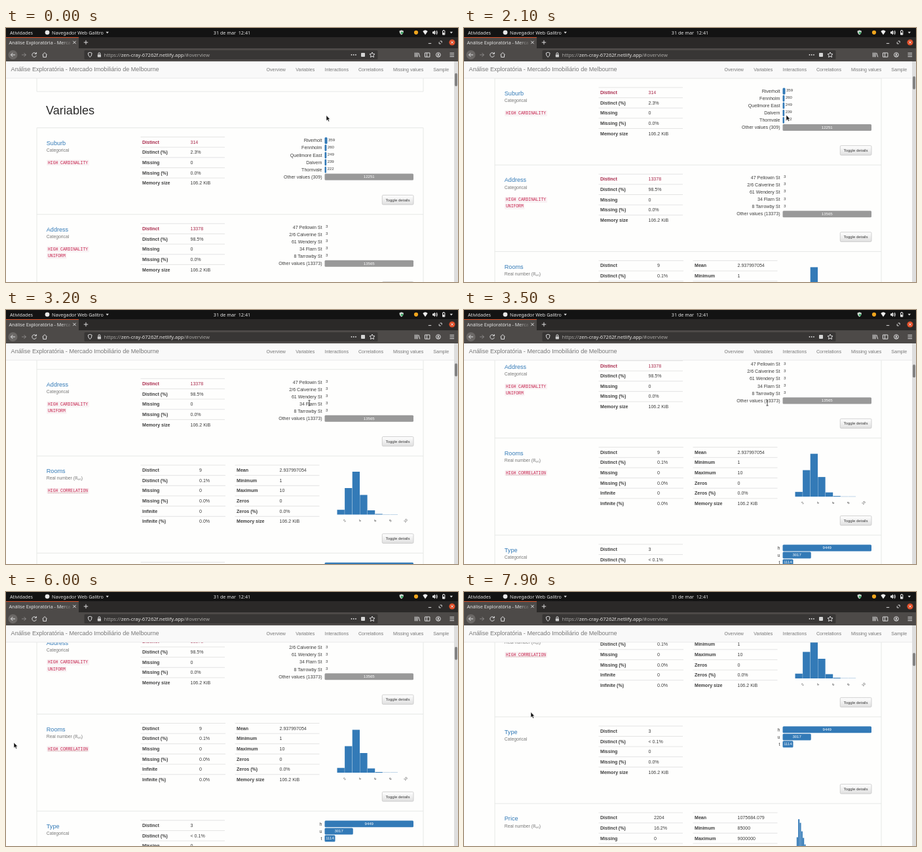
Recreate the animation shown at these times as an HTML page. Size 690 by 388 pixels, loop 8 s.

```html
<!DOCTYPE html>
<html lang="pt">
<head>
<meta charset="utf-8">
<style>
html, body { margin: 0; width: 100%; height: 100%; overflow: hidden; background: #fefefd; }
svg { display: block; width: 690px; height: 388px; font: 7.07px "Liberation Sans", Arial, sans-serif; fill: #3d3d3d; }
text { white-space: pre; }
.ui { font: 7.2px "Noto Sans", sans-serif; fill: #e6e6e6; }
.url { font-size: 7.6px; fill: #a9a7a5; }
.brand { font-size: 9.09px; fill: #777; }
.nav { fill: #777; }
.h1 { font-size: 18.1px; fill: #2a2a2a; }
.name { font-size: 9.09px; fill: #337ab7; }
.cap { font-size: 6.82px; fill: #777; }
.code { font: 6.36px "Liberation Mono", monospace; fill: #c7254e; }
.b { font-weight: bold; }
.hot { fill: #a8284a; }
.small { font-size: 6.06px; }
.in { font-size: 6.06px; fill: #fff; }
.tick { font-size: 5px; }
.end { text-anchor: end; }
.mid { text-anchor: middle; }
.ico { fill: none; stroke: #dededf; stroke-width: 1; }
.rule { stroke: #ddd; stroke-width: .8; }
.box { fill: none; stroke: #e6e8e6; }
</style>
</head>
<body>
<svg id="stage" viewBox="0 0 690 388"></svg>
<script>
const BLUE = '#337ab7', GRAY = '#999', CHROME = '#4d4a48', FIELD = '#383635';
const text = (x, y, s, cls = '') => `<text x="${x}" y="${y}" class="${cls}">${s}</text>`;
const rect = (x, y, w, h, fill, more = '') =>
  `<rect x="${x}" y="${y}" width="${w}" height="${h}" fill="${fill}" ${more}/>`;
const dot = (x, y, r, fill) => `<circle cx="${x}" cy="${y}" r="${r}" fill="${fill}"/>`;
const icon = (d, more = '') => `<path class="ico" d="${d}" ${more}/>`;
const rule = (x1, x2, y) => `<path class="rule" d="M${x1} ${y}H${x2}"/>`;

// rows: [label, value, highlighted]
function table(x1, x2, valueX, top, rows) {
  return rows.map(([label, value, hot], i) => {
    const y = top + 14 + i * 15.65, c = hot ? ' hot' : '';
    return rule(x1, x2, y) + text(x1 + 2.5, y + 10.1, label, 'b' + c) + text(valueX, y + 10.1, value, c);
  }).join('');
}

// items: [label, count, colour]
function bars(top, max, items) {
  return items.map(([label, n, fill = BLUE], i) => {
    const y = top + 14.5 + i * 11.1, w = n / max * 135.5, wide = w > 12;
    return text(482.5, y + 7.3, label, 'end') +
      (w > 1 ? rect(486.5, y, w, 10, fill, 'rx="1.5"') : '') +
      text(wide ? 486.5 + w / 2 : 488 + w, y + (wide ? 6.8 : 5.6), n, wide ? 'in mid' : 'small');
  }).join('');
}

function histogram(top, step, heights) {
  return heights.map((h, i) =>
    rect(505.5 + i * step, top + 89.5 - h, step - .3, h, BLUE)).join('');
}

function card(top, bottom, name, caption, codes = [], dotted) {
  const tags = codes.map((s, i) => {
    const y = top + 48.8 + i * 10.1;
    return rect(62, y, s.length * 3.816 + 4, 9, '#f9f2f4', 'rx="1.5"') + text(64, y + 6.3, s, 'code') +
      (dotted ? `<path d="M64 ${y + 7.7}h${s.length * 3.816}" stroke="#b77" stroke-width=".6" stroke-dasharray="1 .6"/>` : '');
  }).join('');
  const y = bottom - 29.5;
  return `<path class="box" d="M47 ${bottom}H637"/>` + text(61.8, top + 26.3, name, 'name') +
    text(61.8, top + 36.4, caption, 'cap') + tags +
    rect(574.3, y, 47.7, 14.5, 'url(#btn)', 'rx="1.5" stroke="#c6c6c6" stroke-width=".8"') +
    text(598, y + 9.3, 'Toggle details', 'small mid');
}

function page() {
  const T = [152.5, 284.8, 417, 565.3, 697.6, 846];
  const real = 'Real number (ℝ<tspan font-size="4.4" dy="1">≥0</tspan><tspan dy="-1">)</tspan>';
  const missing = [['Missing', '0'], ['Missing (%)', '0.0%']];
  const size = ['Memory size', '106.2 KiB'];
  const basic = (n, pct, hot) => [['Distinct', n, hot], ['Distinct (%)', pct], ...missing];
  const infinite = [['Infinite', '0'], ['Infinite (%)', '0.0%']];
  const stats = (mean, min, max) => [['Mean', mean], ['Minimum', min], ['Maximum', max],
    ['Zeros', '0'], ['Zeros (%)', '0.0%'], size];
  const ticks = [2, 4, 6, 8, 10].map((n, i) => {
    const x = 517 + i * 23.3, y = T[2] + 99;
    return `<text class="tick mid" transform="translate(${x} ${y}) rotate(-45)" y="1.5">${n}</text>`;
  }).join('');

  return '<path class="box" d="M47 0V97H637V0M47 900V152.5H637V900"/>' + text(61, 132.2, 'Variables', 'h1') +
    card(T[0], T[1], 'Suburb', 'Categorical', ['HIGH CARDINALITY']) +
    table(205.5, 334, 281.5, T[0], [...basic('314', '2.3%', 1), size]) +
    bars(T[0], 12251, [['Riverholt', 359], ['Fennholm', 260], ['Quellmore East', 249],
      ['Dalvern', 239], ['Thornvale', 222], ['Other values (309)', 12251, GRAY]]) +

    card(T[1], T[2], 'Address', 'Categorical', ['HIGH CARDINALITY', 'UNIFORM']) +
    table(205.5, 334, 281.5, T[1], [...basic('13378', '98.5%', 1), size]) +
    bars(T[1], 13565, [['47 Pellowin St', 3], ['2/6 Calverine St', 3], ['61 Wendery St', 3],
      ['34 Flarn St', 3], ['8 Tarrowby St', 3], ['Other values (13373)', 13565, GRAY]]) +

    card(T[2], T[3], 'Rooms', real, ['HIGH CORRELATION'], true) +
    table(205.5, 335, 295, T[2], [...basic('9', '0.1%'), ...infinite]) +
    table(349.5, 478.5, 417.5, T[2], stats('2.937997054', '1', '10')) +
    histogram(T[2], 11.6, [7.3, 40.5, 65.5, 30, 6.5, 1, .3, .3]) + ticks +

    card(T[3], T[4], 'Type', 'Categorical') +
    table(205.5, 334, 281.5, T[3], [...basic('3', '&lt; 0.1%'), size]) +
    bars(T[3], 9449, [['h', 9449], ['u', 3017], ['t', 1114]]) +

    card(T[4], T[5], 'Price', real) +
    table(205.5, 334, 290, T[4], [...basic('2204', '16.2%'), ...infinite]) +
    table(349.5, 478.5, 417.5, T[4], stats('1075684.079', '85000', '9000000')) +
    histogram(T[4], 2.33, [4, 38, 65.5, 60, 47, 37, 27, 19, 12, 8, 5, 3, 2, 1]);
}

function desktop() {
  return rect(0, 0, 690, 14, '#131313') + text(6, 9.6, 'Atividades', 'ui') +
    dot(63, 6.8, 3.4, '#e8e8e8') + text(70, 9.6, 'Navegador Web Galitro', 'ui') +
    '<path d="M152.5 5.7h4.4l-2.2 2.8z" fill="#ddd"/>' + text(345, 9.6, '31 de mar  12:41', 'ui mid') +
    '<path d="M600.5 4.5l3.2-1.3 3.2 1.3q0 4-3.2 6-3.2-2-3.2-6z" fill="#cfd8d2"/>' + dot(604.5, 7.5, 1.7, '#35a35f') +
    dot(626, 6.8, 3.1, '#f2a51d') +
    '<path d="M636.3 5q3.7-3.4 7.4 0l-3.7 5.4z" fill="#eee"/>' +
    '<path d="M651 5.6h1.6l2.3-2v6.8l-2.3-2H651z" fill="#eee"/>' + icon('M656 5q1.4 2 0 4M657.4 3.8q2.4 3.2 0 6.4', 'stroke-width=".7"') +
    icon('M666.5 4.2h3.4v6h-3.4zM667.4 3.4h1.6') + rect(667, 7, 2.4, 3, '#eee') +
    '<path d="M677.6 5.7h4.4l-2.2 2.8z" fill="#ddd"/>';
}

function browser() {
  return rect(0, 14, 690, 17, '#2b2928') + rect(0, 14, 111, 17, CHROME) + rect(0, 14, 111, 1, '#d9532c') +
    text(4.5, 24.8, 'Análise Exploratória - Merca', 'ui') + rect(84, 16, 17, 13, 'url(#fade)') +
    icon('M102.3 19.8l4.4 4.4m0-4.4l-4.4 4.4M118.8 22h6.4M122 18.8v6.4') +
    icon('M644.8 23.6h4.4M661.2 21.4v2.6h2.6M662.6 20h2.6v2.6') +
    dot(681, 22, 4.6, '#e2502a') + icon('M679.3 20.3l3.4 3.4m0-3.4l-3.4 3.4') +
    rect(0, 31, 690, 20, CHROME) +
    dot(10.5, 41, 7, '#6b6866') + icon('M14 41H7.4m3-3l-3 3 3 3') +
    icon('M24 41h6.4m-3-3l3 3-3 3', 'opacity=".4"') +
    icon('M46 39.4a3.3 3.3 0 1 0 .3 2.6M46.4 37v2.6h-2.6') +
    icon('M55.5 41l3.6-3.4 3.6 3.4M56.7 40.5v4h4.8v-4') +
    rect(119.5, 34, 448, 14, FIELD, 'rx="1.5"') +
    icon('M125.3 38.3l2.9-1.1 2.9 1.1q0 4.3-2.9 6.3-2.9-2-2.9-6.3z') +
    rect(139.8, 40.6, 5.2, 3.8, '#ccc', 'rx=".6"') + icon('M141 40.6v-1.6a1.4 1.4 0 0 1 2.8 0v1.6', 'stroke-width=".8"') +
    text(149.5, 43.8, 'https://<tspan fill="#e4e2e0">zen-cray-67262f.netlify.app</tspan>/#overview', 'ui url') +
    [527.5, 530.7, 533.9].map(x => dot(x, 41, .9, '#ddd')).join('') +
    rect(542, 38, 6, 6, '#d4d4d4', 'rx="1"') +
    icon('M559 37l1.2 2.6 2.8.3-2.1 1.9.6 2.8-2.5-1.4-2.5 1.4.6-2.8-2.1-1.9 2.8-.3z', 'stroke-width=".8"') +
    icon('M624.3 37.6v6.8M626.3 37.6v6.8M628.2 37.6v6.8M629.8 38l2 6.4') +
    icon('M639.5 38h7.4v6.2h-7.4zM642.5 38v6.2') +
    icon('M656.5 41a3.4 3.4 0 1 0 6.8 0 3.4 3.4 0 1 0-6.8 0M657.7 43.2q2.2-1.6 4.4 0') + dot(659.9, 40.2, 1.2, '#ddd') +
    icon('M677.5 38.3h6.6M677.5 41h6.6M677.5 43.7h6.6');
}

function navbar() {
  const links = [['Overview', 397.5], ['Variables', 442.3], ['Interactions', 486.5],
    ['Correlations', 538], ['Missing values', 591], ['Sample', 652.3]];
  return rect(0, 51, 684, 26, '#f9f9f9') + rect(0, 76.5, 684, .7, '#e3e3e3') +
    text(7.6, 66.2, 'Análise Exploratória - Mercado Imobiliário de Melbourne', 'brand') +
    links.map(([s, x]) => text(x, 65.6, s, 'nav')).join('') +
    rect(684, 51, 6, 337, '#dedede') + rect(685, 69, 4, 20, '#828282', 'id="thumb" rx="2"');
}

const $ = id => document.getElementById(id);
$('stage').innerHTML = `<defs>
  <linearGradient id="btn" x2="0" y2="1"><stop stop-color="#fff"/><stop offset="1" stop-color="#e0e0e0"/></linearGradient>
  <linearGradient id="fade"><stop stop-color="${CHROME}" stop-opacity="0"/><stop offset="1" stop-color="${CHROME}"/></linearGradient>
</defs>
<g id="page">${page()}</g>${navbar()}${desktop()}${browser()}
<path id="arrow" d="M0 0V8.2L1.9 6.5 3.2 9.4 4.6 8.8 3.3 6H5.7Z" fill="#111" stroke="#fff" stroke-width=".5"/>
<path id="beam" d="M-1.6-4H1.6M0-4V4M-1.6 4H1.6" fill="none" stroke="#222" stroke-width=".8"/>`;

// keys: [time, ...values]
const scrollKeys = [[1500, 0], [2100, 75.6], [2700, 157], [2800, 157], [3200, 194], [3600, 230.5],
  [6100, 230.5], [7000, 374.5]];
const mouseKeys = [[0, 489, 133.5], [700, 489, 133.5], [1000, 492, 133], [2800, 492, 133], [3100, 463, 142],
  [3700, 463, 142], [4100, 300, 150], [4500, 108, 82], [4600, 108, 82], [4900, 150, 140], [5200, 100, 240],
  [5500, 16, 270], [5900, 12, 230], [7000, 12, 230], [7400, 60, 205], [7800, 102, 183.5]];

function at(keys, t) {
  const i = keys.findIndex(k => k[0] > t);
  if (i < 0) return keys[keys.length - 1].slice(1);
  if (i === 0) return keys[0].slice(1);
  const a = keys[i - 1], b = keys[i], p = (t - a[0]) / (b[0] - a[0]);
  return a.slice(1).map((v, j) => v + (b[j + 1] - v) * p);
}

function move(id, x, y) { $(id).setAttribute('transform', `translate(${x} ${y})`); }

function draw(now) {
  const t = Math.floor(now % 8000 / 100) * 100;
  const [scroll] = at(scrollKeys, t), [x, y] = at(mouseKeys, t);
  const overText = t >= 3100 && t <= 3700;
  move('page', 0, -scroll);
  move('thumb', 0, scroll * .064);
  move('arrow', x, y);
  move('beam', x, y);
  $('arrow').style.display = overText ? 'none' : '';
  $('beam').style.display = overText ? '' : 'none';
  requestAnimationFrame(draw);
}
requestAnimationFrame(draw);
</script>
</body>
</html>
```
